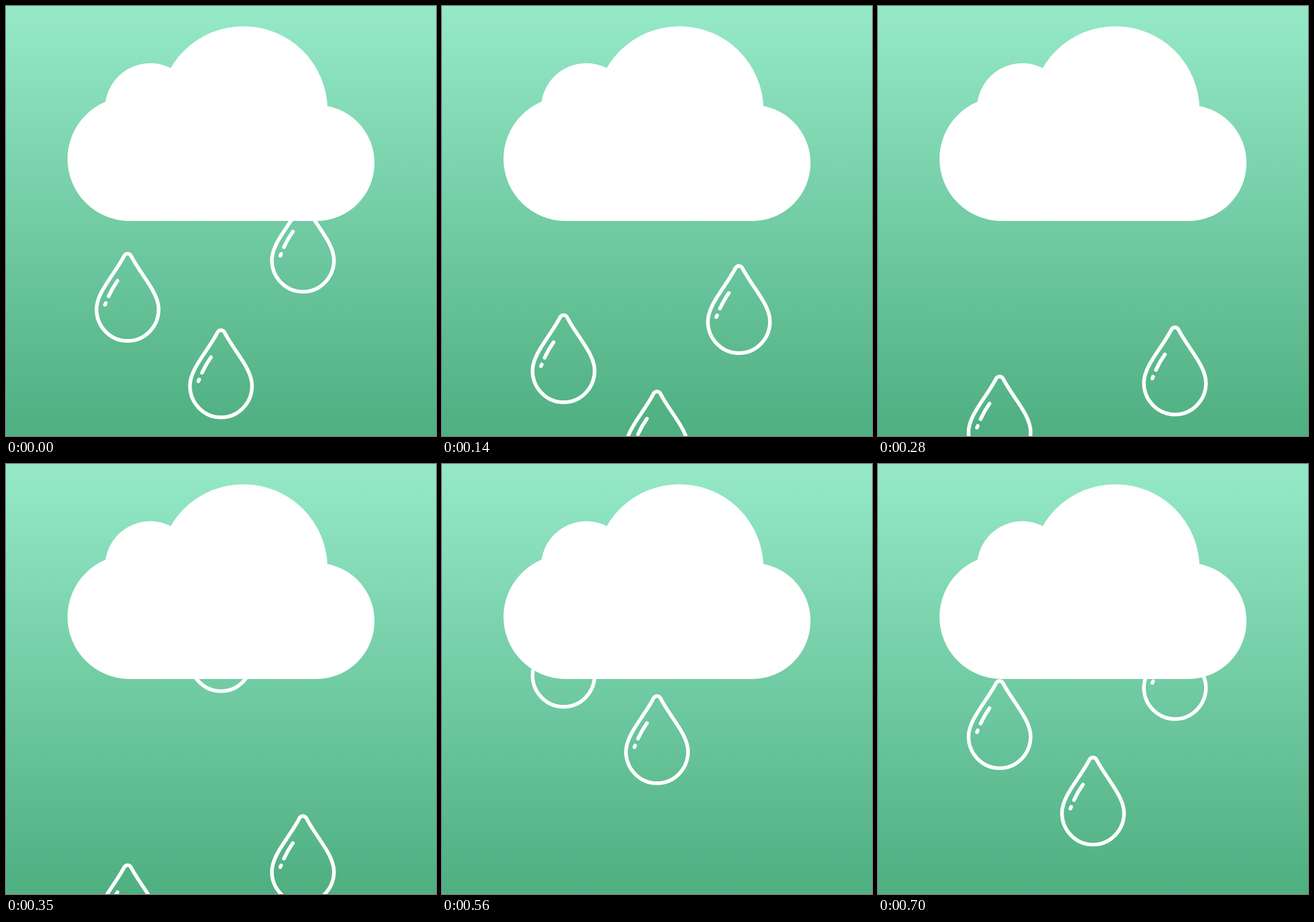
An HTML page that plays this animation: 748 px wide and 748 px high, repeating every 770 ms.

```html
<!DOCTYPE html>
<html lang="en">
<head>
<meta charset="utf-8">
<title>Rain cloud</title>
<style>
  html, body { margin: 0; width: 100%; height: 100%; overflow: hidden; }
  svg { display: block; width: 100vw; height: 100vh; background: linear-gradient(#94e8c6 2%, #50b082 98%); }
  #drop { fill: none; stroke: #fff; stroke-width: 6.4; stroke-linecap: round; }
</style>
</head>
<body>
<svg viewBox="0 0 748 748">
  <defs>
    <g id="drop">
      <path d="M-7 9C-4 1.5 4 1.5 7 9C24 41 54 71 54 100A54 55 0 0 1-54 100C-54 71-24 41-7 9Z"/>
      <path d="M-17.5 50.5Q-26.5 63-33 77.5M-38 89.3L-39.3 92.3"/>
    </g>
  </defs>
  <use class="rain" href="#drop"/>
  <use class="rain" href="#drop"/>
  <use class="rain" href="#drop"/>
  <g fill="#fff">
    <circle cx="215" cy="266" r="108"/>
    <circle cx="251" cy="178.3" r="78.8"/>
    <circle cx="413" cy="181.6" r="146.4"/>
    <circle cx="540" cy="273" r="101"/>
    <rect x="215" y="180" width="325" height="194"/>
  </g>
</svg>
<script>
  const STEP_MS = 70, STEPS = 11, FALL = 53.4;
  const SPAN = FALL * STEPS, FLOOR = 752, CEILING = FLOOR - SPAN;
  const starts = [[211.5, 427.5], [374, 560.5], [516.5, 342]];
  const drops = document.querySelectorAll('.rain');

  function draw(now) {
    const step = Math.floor(now / STEP_MS) % STEPS;
    starts.forEach(([x, y], i) => {
      // Drops re-enter hidden behind the cloud.
      const top = CEILING + (y + step * FALL - CEILING) % SPAN;
      drops[i].setAttribute('transform', `translate(${x} ${top})`);
    });
  }

  const begin = performance.now();
  function tick() {
    draw(performance.now() - begin);
    requestAnimationFrame(tick);
  }
  tick();
</script>
</body>
</html>
```
